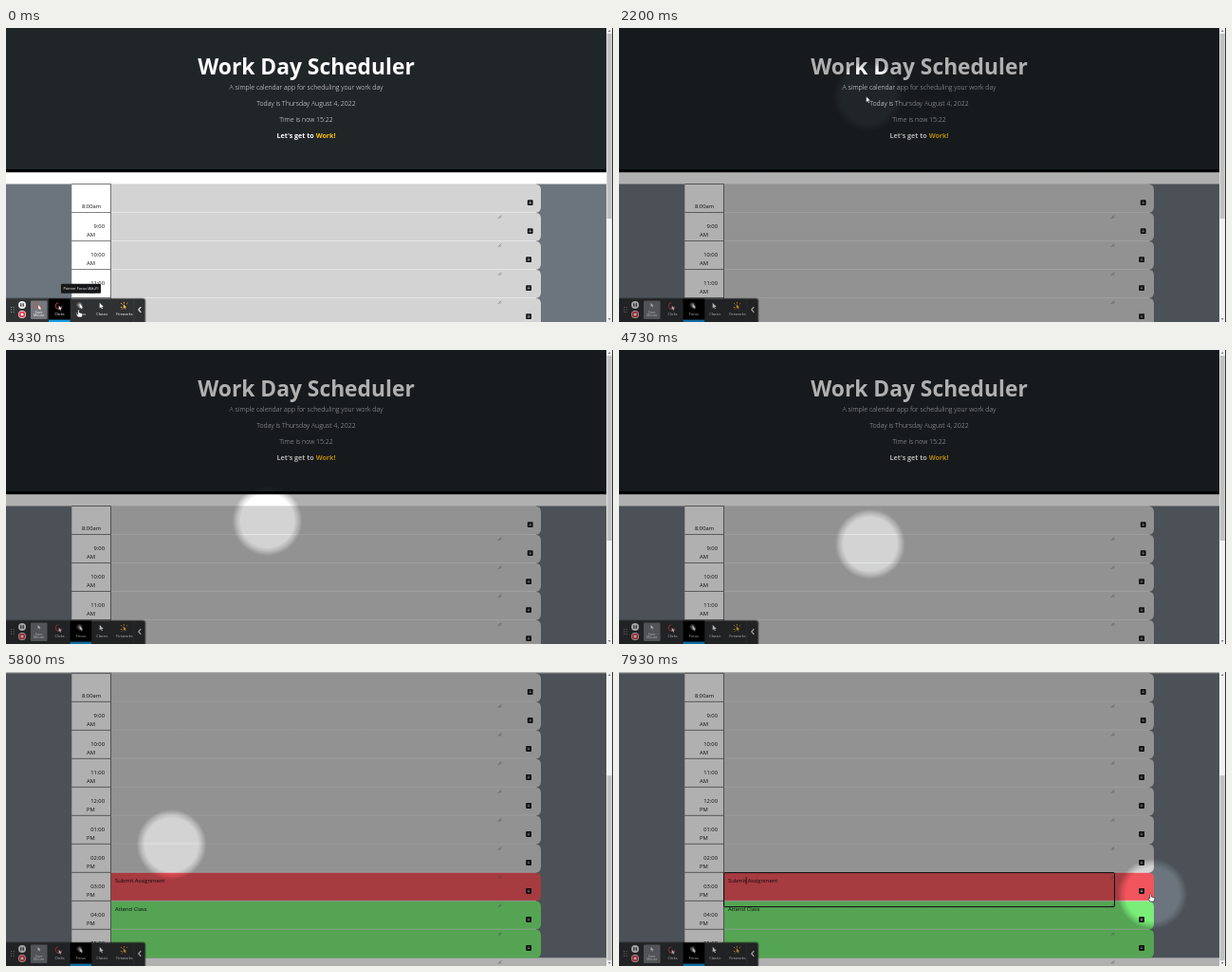
These frames come from a looping animation (640x310 px, 8 s). An HTML page:

```html
<!DOCTYPE html>
<html lang="en">
<head>
<meta charset="utf-8">
<title>Work Day Scheduler</title>
<style>
  html, body { margin: 0; width: 100%; height: 100%; overflow: hidden; background: #fff; }
  svg { display: block; width: 100%; height: 100%; }
  text { font-family: "Open Sans", "Noto Sans", sans-serif; }
  .mid { text-anchor: middle; }
  .intro { font-size: 7px; font-weight: 300; fill: #fff; }
  .row text { font-size: 5.8px; fill: #111; }
  .tool text { font-size: 3.9px; fill: #fff; }
  .tool .small text { font-size: 3.6px; }
</style>
</head>
<body>
<svg viewBox="0 0 640 310" preserveAspectRatio="none">
  <defs>
    <radialGradient id="spot" gradientUnits="userSpaceOnUse" r="37">
      <stop offset=".76" stop-opacity="0"/>
      <stop offset=".88" stop-opacity=".14"/>
      <stop offset="1" stop-opacity=".31"/>
    </radialGradient>
    <radialGradient id="glow">
      <stop offset="0" stop-color="#aaa"/>
      <stop offset="1" stop-color="#aaa" stop-opacity="0"/>
    </radialGradient>
    <path id="arrow" d="M0 0V6.6L1.6 5.2L2.7 7.6L3.8 7.1L2.7 4.8H4.8Z"/>
    <path id="hand" d="M-.8 .6Q0-.6 .8 .6V3L3.7 3.7Q4.6 4 4.3 5.4L3.6 8H-.5L-2.7 5Q-2.3 3.8-.8 5Z" fill="#fff" stroke="#111" stroke-width=".6"/>
    <g id="ring">
      <circle r="3.3" fill="none" stroke="#d8434c" stroke-width=".9" stroke-dasharray="15 6"/>
      <use href="#arrow" fill="#fff" transform="translate(.2 -.2) scale(.65)"/>
    </g>
  </defs>

  <g id="page">
    <rect width="633" height="600" fill="#fff"/>
    <rect width="633" height="149.2" fill="#202528"/>
    <rect y="149" width="633" height="3.2" fill="#000"/>
    <text class="mid" x="316.5" y="48.6" font-size="22.8" font-weight="700" fill="#fff">Work Day Scheduler</text>
    <g class="intro mid">
      <text x="316.5" y="64.7">A simple calendar app for scheduling your work day</text>
      <text x="316.5" y="81.9">Today is Thursday August 4, 2022</text>
      <text x="316.5" y="99.1">Time is now 15:22</text>
      <text x="316.5" y="116.2" font-weight="700" font-size="7.15">Let's get to <tspan fill="#ffc107">Work!</tspan></text>
    </g>
    <rect y="164.5" width="633" height="300" fill="#6c757d"/>
    <g id="rows"></g>
    <g id="focus" fill="none" stroke="#111">
      <rect x="110.6" y="374.8" width="411.9" height="36" rx=".8"/>
      <path id="caret" d="M134.2 379.5v7.5" stroke-width=".8"/>
    </g>
  </g>

  <g class="tool">
    <path d="M0 284.6H144.5Q147.5 284.6 147.5 287.6V310H0Z" fill="#000" opacity=".35"/>
    <path d="M0 285.5H144Q146.5 285.5 146.5 288V310H0Z" fill="#303133"/>
    <path d="M5.5 294v6M8 294v6" stroke="#999" stroke-dasharray="1 1.5"/>
    <circle cx="17" cy="292" r="4" fill="#eee"/>
    <path d="M15.8 290.2v3.6M18.2 290.2v3.6" stroke="#222" stroke-width="1.1"/>
    <circle cx="17" cy="302" r="4" fill="#eee"/>
    <circle cx="17" cy="302" r="3.3" fill="#e0394a"/>
    <rect x="15.7" y="300.7" width="2.6" height="2.6" fill="#fff"/>
    <rect x="26" y="287.5" width="17.5" height="19.5" rx="1" fill="#75797d"/>
    <g class="mid small">
      <text x="34.7" y="300.6">Save</text>
      <text x="34.7" y="304.4">Mouse</text>
    </g>
    <use id="savedRing" href="#ring" x="34" y="292.5"/>
    <use id="savedArrow" href="#arrow" fill="#fff" transform="translate(33.6 290) scale(.6)"/>
    <g id="selected">
      <rect y="285.5" width="22.7" height="24.5" fill="#000"/>
      <rect y="307.6" width="22.7" height="2.4" fill="#189be0"/>
    </g>
    <use href="#ring" x="55.5" y="293"/>
    <circle cx="77.5" cy="292" r="3.6" fill="url(#glow)"/>
    <use href="#arrow" fill="#fff" transform="translate(77.7 290.8) scale(.75)"/>
    <use href="#arrow" fill="#fff" transform="translate(98.7 289.8) scale(.85)"/>
    <path d="M121 290l1.4 1.4M124.5 288.9v1.6M128.3 290l-1.2 1.2M120.8 294.5h1.6M122 296.6l1-1" stroke="#f2a52b"/>
    <use href="#arrow" fill="#f7c04a" transform="translate(123.8 291.2) scale(.7)"/>
    <g class="mid">
      <text x="56.5" y="303.4">Clicks</text>
      <text x="79" y="303.4">Focus</text>
      <text x="101.3" y="303.4">Classic</text>
      <text x="125" y="303.4">Fireworks</text>
    </g>
    <path d="M134.8 286v24" stroke="#444" stroke-width=".6"/>
    <path d="M142.3 294.2L139.8 297L142.3 299.8" fill="none" stroke="#fff" stroke-width="1.1"/>
    <g id="tip">
      <rect x="58" y="269.8" width="42" height="10" rx="1" fill="#17181a"/>
      <text class="mid" x="79" y="276.2">Pointer Focus (Alt+F)</text>
    </g>
  </g>

  <rect id="dim" width="633" height="310" fill="url(#spot)"/>

  <rect x="633" width="6" height="310" fill="#f1f1f1"/>
  <rect x="639" width="1" height="310" fill="#333"/>
  <rect id="thumb" x="633.6" y="6" width="5" height="195" fill="#c1c1c1"/>
  <path d="M634.8 3.8L636.2 2.2L637.6 3.8ZM634.8 306.2L636.2 307.8L637.6 306.2Z" fill="#505050"/>

  <use id="handCursor" href="#hand"/>
  <use id="arrowCursor" href="#arrow" fill="#fff" stroke="#111" stroke-width=".5"/>
</svg>

<script>
const LOOP = 8000, STEP = 1000 / 15;
const SELECT_AT = 400, TIP_END = 880, CLICK_AT = 6660;
const TABLE_TOP = 164.7, ROW = 30;
const $ = id => document.getElementById(id);

const hours = ["8:00am", "9:00", "10:00", "11:00", "12:00", "01:00", "02:00", "03:00", "04:00", "05:00"];
const notes = { 7: "Submit Assignment", 8: "Attend Class" };

function rowMarkup(hour, i) {
  const color = i < 7 ? "#d3d3d3" : i === 7 ? "#f0555d" : "#7bee79";
  const label = i === 0
    ? `<text x="80" y="25.4">${hour}</text>`
    : `<text x="104" y="16.6" text-anchor="end">${hour}</text><text x="85" y="25.4">${i < 4 ? "AM" : "PM"}</text>`;
  const saveX = i < 2 ? 549.8 : 548.2;
  return `<g class="row" transform="translate(0 ${TABLE_TOP + i * ROW})">
    <rect x="69.3" width="41.2" height="30" fill="#fff"/>
    <path d="M111 0H558Q564 0 564 6V24Q564 30 558 30H111Z" fill="${color}"/>
    <path d="M111 -.2H559" stroke="#fff" stroke-opacity=".75" stroke-width=".8"/>
    <path d="M69.3 -.2H110.5V30" fill="none" stroke="#444" stroke-width=".6"/>
    ${label}
    <text x="115" y="10.5">${notes[i] || ""}</text>
    <rect x="${saveX}" y="16.6" width="5.8" height="5.8" rx=".8" fill="#151515"/>
    <path d="M${saveX + 2.9} 17.8v2.4m-1.3-.9l1.3 1.4l1.3-1.4" fill="none" stroke="#ddd" stroke-width=".6"/>
  </g>`;
}

const grips = hours.map((_, i) => {
  const y = TABLE_TOP + i * ROW + 36;
  return `M519 ${y}l3-3M521 ${y}l1.2-1.2`;
}).join("");
$("rows").innerHTML = hours.map(rowMarkup).join("") +
  `<path d="${grips}" stroke="#555" stroke-width=".6"/>`;

// [time, x, y]
const pointer = [
  [0, 78, 297], [750, 78, 297], [1250, 210, 215], [1730, 355, 98], [1850, 375, 86],
  [2200, 262, 72], [2560, 215, 105], [2900, 310, 80], [3130, 412, 140], [3420, 345, 265],
  [3750, 235, 150], [3980, 240, 98], [4333, 275, 180], [4600, 270, 205], [5266, 223, 199],
  [5800, 174, 182], [6130, 165, 197], [6560, 136, 221], [6800, 136, 221], [7200, 201, 222],
  [7520, 570, 117], [7660, 604, 148], [7933, 562, 234], [8000, 561, 235]
];
const scrolling = [[0, 0], [4850, 0], [5266, 89.3], [5560, 163.2], [8000, 163.2]];

// Smooth interpolation through keys without overshoot.
function follow(keys, t, col) {
  let i = 0;
  while (i < keys.length - 2 && t >= keys[i + 1][0]) i++;
  const rate = k => k < 0 || k > keys.length - 2 ? 0
    : (keys[k + 1][col] - keys[k][col]) / (keys[k + 1][0] - keys[k][0]);
  const tangent = (a, b) => a * b <= 0 ? 0 : 2 * a * b / (a + b);
  const span = keys[i + 1][0] - keys[i][0], u = (t - keys[i][0]) / span;
  const m0 = tangent(rate(i - 1), rate(i)) * span;
  const m1 = tangent(rate(i), rate(i + 1)) * span;
  const ease = u * u * (3 - 2 * u);
  return keys[i][col] + (keys[i + 1][col] - keys[i][col]) * ease
    + m0 * u * (1 - u) ** 2 - m1 * u * u * (1 - u);
}

const show = (id, on) => $(id).setAttribute("visibility", on ? "visible" : "hidden");
const move = (id, x, y) => $(id).setAttribute("transform", `translate(${x} ${y})`);

function cursorKind(x, y, scroll) {
  if (y > 285 && x < 147) return "hand";
  if (y + scroll < TABLE_TOP || x < 111 || x > 564) return "arrow";
  return x > 523 ? "hand" : "none";
}

function draw(time) {
  const t = Math.floor((time + 7) / STEP) * STEP % LOOP;
  const x = follow(pointer, t, 1), y = follow(pointer, t, 2);
  const scroll = follow(scrolling, t, 1);
  const focusMode = t >= SELECT_AT;

  move("page", 0, -scroll);
  move("thumb", 0, scroll * 0.632);
  $("spot").setAttribute("cx", x + 0.5);
  $("spot").setAttribute("cy", y);
  $("dim").setAttribute("opacity", Math.min(1, Math.max(0, (t - SELECT_AT) / 200)));

  move("selected", focusMode ? 67.6 : 45, 0);
  show("savedRing", !focusMode);
  show("savedArrow", focusMode);
  show("tip", t < TIP_END);
  show("focus", t >= CLICK_AT);
  show("caret", t >= CLICK_AT && (t - CLICK_AT) % 1200 < 600);

  const kind = cursorKind(x, y, scroll);
  for (const name of ["hand", "arrow"]) {
    show(name + "Cursor", kind === name);
    move(name + "Cursor", x - 1.5, y);
  }
}

const start = performance.now();
function tick() {
  draw((performance.now() - start) % LOOP);
  requestAnimationFrame(tick);
}
tick();
</script>
</body>
</html>
```
